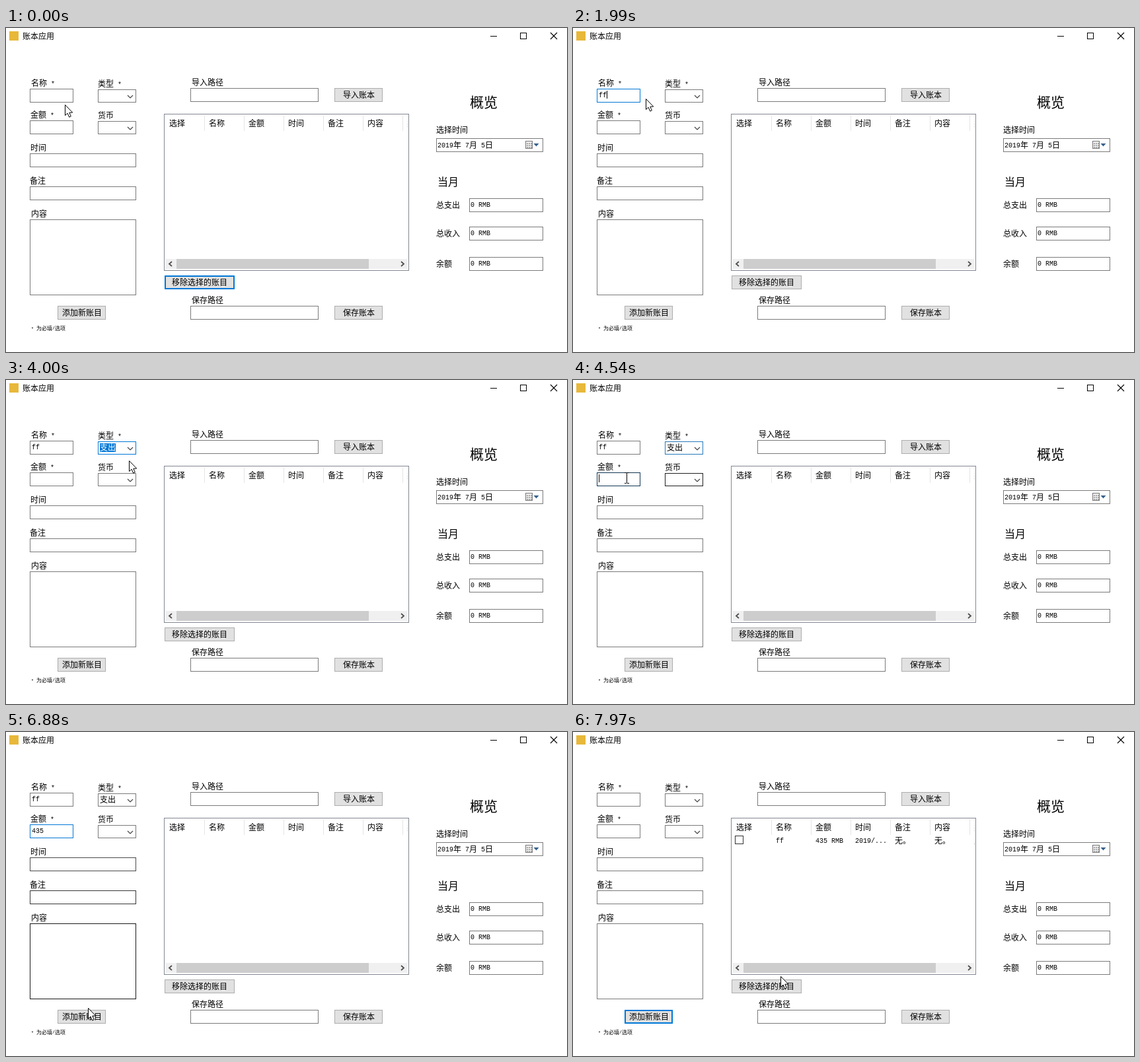
Write an HTML page with a canvas that moves like this. It is 849x491 px and loops after 8000 ms.

```html
<!DOCTYPE html>
<html lang="zh-CN">
<head>
<meta charset="utf-8">
<title>账本应用</title>
<style>
html, body { margin: 0; width: 100%; height: 100%; overflow: hidden; background: #fff; }
canvas { display: block; }
</style>
</head>
<body>
<canvas id="stage" width="849" height="491"></canvas>
<script>
const ctx = document.getElementById('stage').getContext('2d');
const LOOP = 8000, TICK = 77.3;
const GRAY = [122, 122, 122], DARK = [23, 23, 23], BLUE = [0, 120, 215];
const ACCENT = '#0078d7';

// Pointer path: time, x, y
const path = [
  [0, 89, 116], [210, 78, 105], [1850, 78, 105], [2000, 110, 107], [2380, 176, 106],
  [3290, 176, 106], [3400, 191, 102], [3580, 191, 102], [3760, 186, 122],
  [4100, 186, 122], [4300, 187, 150], [4530, 82, 148], [6340, 82, 148],
  [6490, 92, 201], [6570, 98, 251], [6870, 124, 417], [6945, 125, 442],
  [7250, 125, 442], [7330, 124, 434], [7650, 124, 434], [7940, 314, 370]
];
const hidden = [[1290, 1880], [3000, 3300], [5150, 6390]];
const clicks = [[520, 680], [2400, 2600], [3430, 3600], [3760, 3910], [4600, 4690], [7480, 7580]];
const focus = {
  remove: [-1e4, 440], name: [440, 2400], type: [2400, 4490],
  amount: [4490, 7480], add: [7480, 1e5]
};
const fields = {
  name: [36, 92, 66, 21], amount: [36, 140, 66, 21], time: [36, 190, 161, 21],
  note: [36, 240, 161, 21], content: [36, 290, 161, 115]
};
const combos = { type: [139, 93, 58, 20], currency: [139, 141, 58, 20] };

const clamp = v => Math.max(0, Math.min(1, v));
const during = (t, [from, to]) => t >= from && t < to;
const inside = ([px, py], [x, y, w, h]) => px >= x && px < x + w && py >= y && py <= y + h;
const mix = (a, b, k) => a.map((v, i) => v + (b[i] - v) * k);
const rgb = c => `rgb(${c.map(Math.round)})`;

function pointer(t) {
  const i = path.findIndex(p => p[0] > t);
  if (i < 0) return path[path.length - 1].slice(1);
  if (i === 0) return path[0].slice(1);
  const [a, b] = [path[i - 1], path[i]], k = (t - a[0]) / (b[0] - a[0]);
  return [1, 2].map(n => Math.round(a[n] + (b[n] - a[n]) * k));
}

function fill(color, x, y, w, h) {
  ctx.fillStyle = color;
  ctx.fillRect(x, y, w, h);
}

function box([x, y, w, h], border, back = '#fff') {
  fill(back, x, y, w, h);
  ctx.strokeStyle = border;
  ctx.lineWidth = 1;
  ctx.strokeRect(x + .5, y + .5, w - 1, h - 1);
}

function line(points, color, width = 1) {
  ctx.beginPath();
  points.forEach(p => ctx.lineTo(...p));
  ctx.strokeStyle = color;
  ctx.lineWidth = width;
  ctx.stroke();
}

// Full-width characters advance one em, half-width ones half an em
function text(str, x, cy, size = 12, color = '#000', weight = 400) {
  ctx.fillStyle = color;
  for (const ch of str) {
    const wide = ch > '\u2fff';
    ctx.font = wide ? `${weight} ${size}px "Noto Sans CJK SC", "Noto Sans CJK", sans-serif`
                    : `${size / 1.2}px "Liberation Mono", monospace`;
    ctx.fillText(ch, x, Math.round(cy + size * (wide ? .38 : .3)) + (ch === '*' ? 1 : 0));
    x += wide || ch === '。' ? size : size / 2;
  }
}

function clipped(rect, draw) {
  ctx.save();
  ctx.beginPath();
  ctx.rect(...rect);
  ctx.clip();
  draw();
  ctx.restore();
}

function focusLevel(id, t) {
  if (!focus[id]) return 0;
  const [from, to] = focus[id];
  return clamp((t - from) / 200) * (1 - clamp((t - to) / 200));
}

function borderColor(id, rect, t) {
  let hover = 0;
  for (let age = 0; age < 7; age++) {
    const s = t - age * TICK;
    if (!hidden.some(h => during(s, h)) && inside(pointer(s), rect)) {
      hover = 1 - (age / 7) ** 2;
      break;
    }
  }
  return rgb(mix(mix(GRAY, DARK, hover), BLUE, focusLevel(id, t)));
}

function button(id, label, rect, t) {
  const [x, y, w, h] = rect, hover = inside(pointer(t), rect) && t > 6800;
  const focused = focus[id] && during(t, focus[id]);
  box(rect, hover || focused ? ACCENT : '#adadad', hover ? '#e5f1fb' : '#e1e1e1');
  if (focused) {
    ctx.strokeStyle = ACCENT;
    ctx.lineWidth = 2;
    ctx.strokeRect(x + 1, y + 1, w - 2, h - 2);
  }
  text(label, Math.round(x + (w - label.length * 12) / 2), y + 10);
}

function combo(id, t, open) {
  const rect = combos[id], [x, y, w, h] = rect, at = pointer(t);
  const color = borderColor(id, rect, t);
  box(rect, color);
  if (open || inside(at, [x + 42, y, 16, h])) box([x + 41, y, 17, h], ACCENT, '#cce4f7');
  line([[x + 45, y + 9], [x + 49, y + 13], [x + 53, y + 9]], '#444', 1.2);
}

function dropdown(t) {
  const height = Math.round(clamp((t - 3440) / 110) * 28);
  ctx.save();
  ctx.shadowColor = 'rgba(0,0,0,.5)';
  ctx.shadowBlur = 4;
  ctx.shadowOffsetX = ctx.shadowOffsetY = 3;
  fill('#fff', 139, 113, 58, height + 1);
  ctx.restore();
  clipped([139, 113, 58, height + 1], () => {
    const top = 85 + height;
    box([139, top, 58, 29], '#222');
    const chosen = t > 3650;
    if (chosen) fill(ACCENT, 140, top + 1, 56, 14);
    text('支出', 142, top + 8, 12, chosen ? '#fff' : '#000');
    text('收入', 142, top + 21);
  });
}

function listView(t) {
  box([239, 130, 371, 238], '#828790');
  clipped([240, 131, 368, 218], () => {
    ['选择', '名称', '金额', '时间', '备注', '内容', '类型'].forEach((s, i) => {
      text(s, 247 + 60 * i, 144);
      if (i) fill('#e5e5e5', 240 + 60 * i, 132, 1, 24);
    });
    if (t < 7640) return;
    box([245, 157, 13, 13], '#333');
    ['', 'ff', '435 RMB', '2019/...', '无。', '无。', '支出']
      .forEach((s, i) => text(s, 247 + 60 * i, 164));
  });
  fill('#f0f0f0', 241, 350, 367, 15);
  fill('#cdcdcd', 258, 350, 291, 15);
  line([[251, 354], [247, 357.5], [251, 361]], '#505050', 1.8);
  line([[598, 354], [602, 357.5], [598, 361]], '#505050', 1.8);
}

function titleBar() {
  fill('#e8b83a', 5, 5, 14, 14);
  text('账本应用', 25, 12);
  fill('#000', 733, 12, 10, 1);
  box([778, 7, 10, 10], '#000');
  line([[824, 7], [834, 17]], '#000', 1.1);
  line([[834, 7], [824, 17]], '#000', 1.1);
}

function overview() {
  text('概览', 702, 112, 21, '#000', 300);
  text('选择时间', 651, 154);
  box([651, 167, 162, 21], '#7a7a7a');
  text('2019年 7月 5日', 653, 177);
  box([786, 171, 11, 12], '#777', '#eee');
  for (let i = 0; i < 9; i++) fill('#aaa', 788 + i % 3 * 3, 174 + Math.floor(i / 3) * 3, 2, 2);
  ctx.fillStyle = '#35618e';
  ctx.beginPath();
  ctx.moveTo(798.5, 175);
  ctx.lineTo(806.5, 175);
  ctx.lineTo(802.5, 179.5);
  ctx.fill();
  text('当月', 653, 233, 16, '#000', 300);
  [['总支出', 258], ['总收入', 301], ['余额', 347]].forEach(([label, y]) => {
    text(label, 651, y + 10.5);
    box([701, y, 112, 21], '#7a7a7a');
    text('0 RMB', 703, y + 9);
  });
}

function caret(x, y) {
  fill('#000', x, y, 1, 12);
}

function form(t) {
  const open = during(t, [3440, 3850]), cleared = t >= 7640;
  const name = t < 1215 || cleared ? '' : t < 1670 ? 'f' : 'ff';
  const amount = cleared ? '' : '435'.slice(0, [5150, 5230, 5770].filter(e => t >= e).length);

  [['名称 *', 38, 83], ['类型 *', 139, 84], ['金额 *', 37, 131], ['货币', 139, 132],
   ['时间', 37, 181], ['备注', 36, 231], ['内容', 38, 281], ['导入路径', 281, 82],
   ['保存路径', 281, 412]].forEach(label => text(...label));
  text('* 为必填/选项', 38, 455, 8);

  for (const id in fields) box(fields[id], borderColor(id, fields[id], t));
  box([279, 91, 194, 21], '#7a7a7a');
  box([279, 421, 194, 21], '#7a7a7a');
  text(name, 39, 101);
  text(amount, 39, 149);
  if (during(t, focus.name)) caret(39 + name.length * 6, 95);
  if (during(t, [4490, 6700])) caret(39 + amount.length * 6, 143);

  combo('type', t, open);
  combo('currency', t, false);
  if (during(t, [2400, 3000])) caret(142, 97);
  if (t >= 3850 && !cleared) {
    const selected = t < 4490;
    if (selected) fill(ACCENT, 142, 96, 24, 13);
    text('支出', 142, 102, 12, selected ? '#fff' : '#000');
  }

  button('import', '导入账本', [497, 91, 73, 21], t);
  button('save', '保存账本', [497, 421, 73, 21], t);
  button('add', '添加新账目', [78, 421, 73, 21], t);
  button('remove', '移除选择的账目', [240, 375, 106, 21], t);
  listView(t);
  if (open) dropdown(t);
}

function drawPointer(t) {
  if (hidden.some(h => during(t, h))) return;
  const at = pointer(t), [x, y] = at;
  if (clicks.some(c => during(t, c))) {
    ctx.fillStyle = 'rgba(255,255,0,.6)';
    ctx.beginPath();
    ctx.arc(x, y, 12, 0, 7);
    ctx.fill();
  }
  const [tx, ty, , th] = combos.type, [cx, cy, , ch] = combos.currency;
  const editable = [...Object.values(fields), [tx, ty, 42, th], [cx, cy, 42, ch]];
  if (editable.some(r => inside(at, r))) {
    fill('#000', x - 1, y - 7, 1, 15);
    for (const dy of [-8, 8]) {
      fill('#000', x - 4, y + dy, 3, 1);
      fill('#000', x, y + dy, 3, 1);
    }
    return;
  }
  ctx.beginPath();
  [[0, 0], [0, 16], [3.6, 12.7], [6.2, 18.6], [8.8, 17.4], [6.3, 11.8], [11.2, 11.6]]
    .forEach(([dx, dy]) => ctx.lineTo(x + .5 + dx, y + .5 + dy));
  ctx.closePath();
  ctx.fillStyle = '#fff';
  ctx.fill();
  ctx.strokeStyle = '#000';
  ctx.lineWidth = 1;
  ctx.stroke();
}

function render(now) {
  const t = 70 + Math.floor((now % LOOP - 50) / TICK) * TICK;
  fill('#fff', 0, 0, 849, 491);
  titleBar();
  form(t);
  overview();
  drawPointer(t);
}

const start = performance.now();
function frame() {
  render(performance.now() - start);
  requestAnimationFrame(frame);
}
frame();
</script>
</body>
</html>
```
